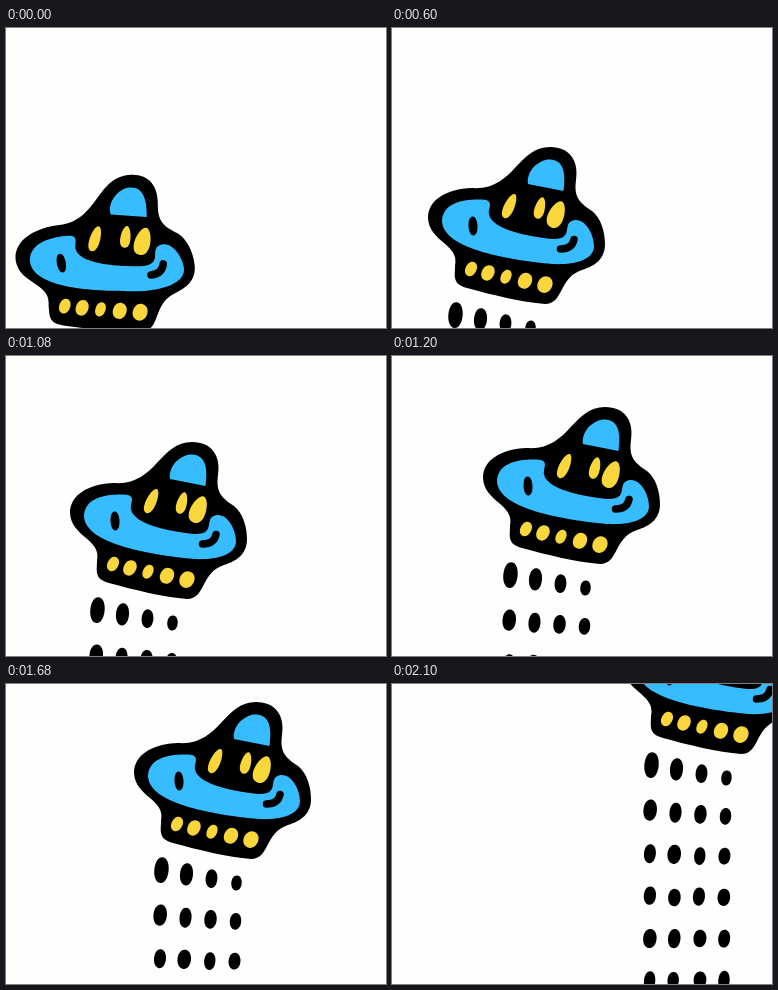
These frames come from a looping animation (380 px wide and 300 px high, 2.4 s). An HTML page:

```html
<!DOCTYPE html>
<html lang="en">
<head>
<meta charset="utf-8">
<title>Flying saucer</title>
<style>
  html, body { margin: 0; width: 100%; height: 100%; overflow: hidden; background: #fefefc; }
  svg { display: block; width: 380px; height: 300px; }
</style>
</head>
<body>
<svg viewBox="0 0 380 300">
  <g id="ship">
    <path id="hull" d="M36 190C36 172 54 161 80 160C122 163 125 119 158 119C178 119 187 133 184 152
      C182 168 186 174 200 183C209 190 213 204 213 216C213 231 203 238 190 242C166 250 172 276 153 276
      C130 274 100 267 75 260C60 256 63 248 63 238C68 216 37 214 36 190Z"/>
    <g id="blue-parts" fill="#36bcff">
      <path id="rim" d="M50 193C51 176 68 171 90 171.5C103 172 96 180 97 186C99 202 140 209 160 211
        C184 212 168 194 183 192C194 191 202 207 202 218C202 233 180 237 160 236C120 232 51 222 50 193Z"/>
      <path id="dome" d="M136 156C134 142 148 131 158 131.5C172 132 174 146 171.5 163Z"/>
    </g>
    <path id="mouth" d="M168.5 221Q180 221 182 211.5" fill="none" stroke="#000" stroke-width="7.5" stroke-linecap="round"/>
  </g>
</svg>
<script>
const BLACK = '#000', YELLOW = '#f9d73c';
const LOOP = 2400, STEP = 300;
const PIVOT = '128.3 213.2';
const ship = document.getElementById('ship');

// Oval that narrows towards the top; taper 0 gives an even oval
function drop(x, y, rx, ry, angle, fill, taper = 0) {
  const top = rx * (1.333 - taper), bottom = rx * (1.333 + taper);
  const path = document.createElementNS('http://www.w3.org/2000/svg', 'path');
  path.setAttribute('d',
    `M0 ${-ry}C${top} ${-ry} ${bottom} ${ry} 0 ${ry}C${-bottom} ${ry} ${-top} ${-ry} 0 ${-ry}Z`);
  path.setAttribute('transform', `translate(${x} ${y}) rotate(${angle})`);
  path.setAttribute('fill', fill);
  ship.append(path);
}

// Eye and windows
drop(81, 198, 4.5, 9.5, -3, BLACK);
drop(117.5, 178, 5.2, 13, 24, YELLOW, .3);
drop(148, 180, 5, 11, 15, YELLOW, .4);
drop(164.5, 186.5, 7.8, 14, 22, YELLOW, .4);

// Lights along the base
[5.5, 6.3, 5, 6.8, 7.3].forEach((radius, i) =>
  drop(79 + 16.5 * i + i * i / 2, 241 + 3.9 * i, radius, radius * .5 + 4.8, 27, YELLOW));

// Repeatable noise between -1 and 1
let seed = 7;
function noise() {
  seed = seed * 16807 % 2147483647;
  return seed / 2147483647 * 2 - 1;
}

// Exhaust: slanted and shrinking at the nozzle, evening out further down
for (let row = 0; row < 6; row++) {
  const near = .4 ** row, rough = 1 - near;
  for (let column = 0; column < 4; column++) {
    const side = column - 1.5;
    drop(
      61 + 25 * column + 2.5 * near + rough * noise(),
      293.5 + 41.8 * row + 4.3 * side * near + rough * noise(),
      6.2 - .65 * side * near + .7 * rough * noise(),
      9.2 + (1 - 1.8 * side) * near + rough * noise(),
      5, BLACK);
  }
}

// x, y and tilt; the ship hops between poses without tweening
const poses = [
  [-24.1, 31.1, -7.2], [0, 0, 0], [28, -33, 0], [55, -68, 0],
  [92, -101, 0], [143.5, -152, 0], [196, -206, 0]
];

const start = performance.now();
function render() {
  const time = (performance.now() - start) % LOOP;
  // The first pose holds for two steps
  const [x, y, tilt] = poses[Math.max(0, Math.floor(time / STEP) - 1)];
  ship.setAttribute('transform', `translate(${x} ${y}) rotate(${tilt} ${PIVOT})`);
  requestAnimationFrame(render);
}
render();
</script>
</body>
</html>
```
